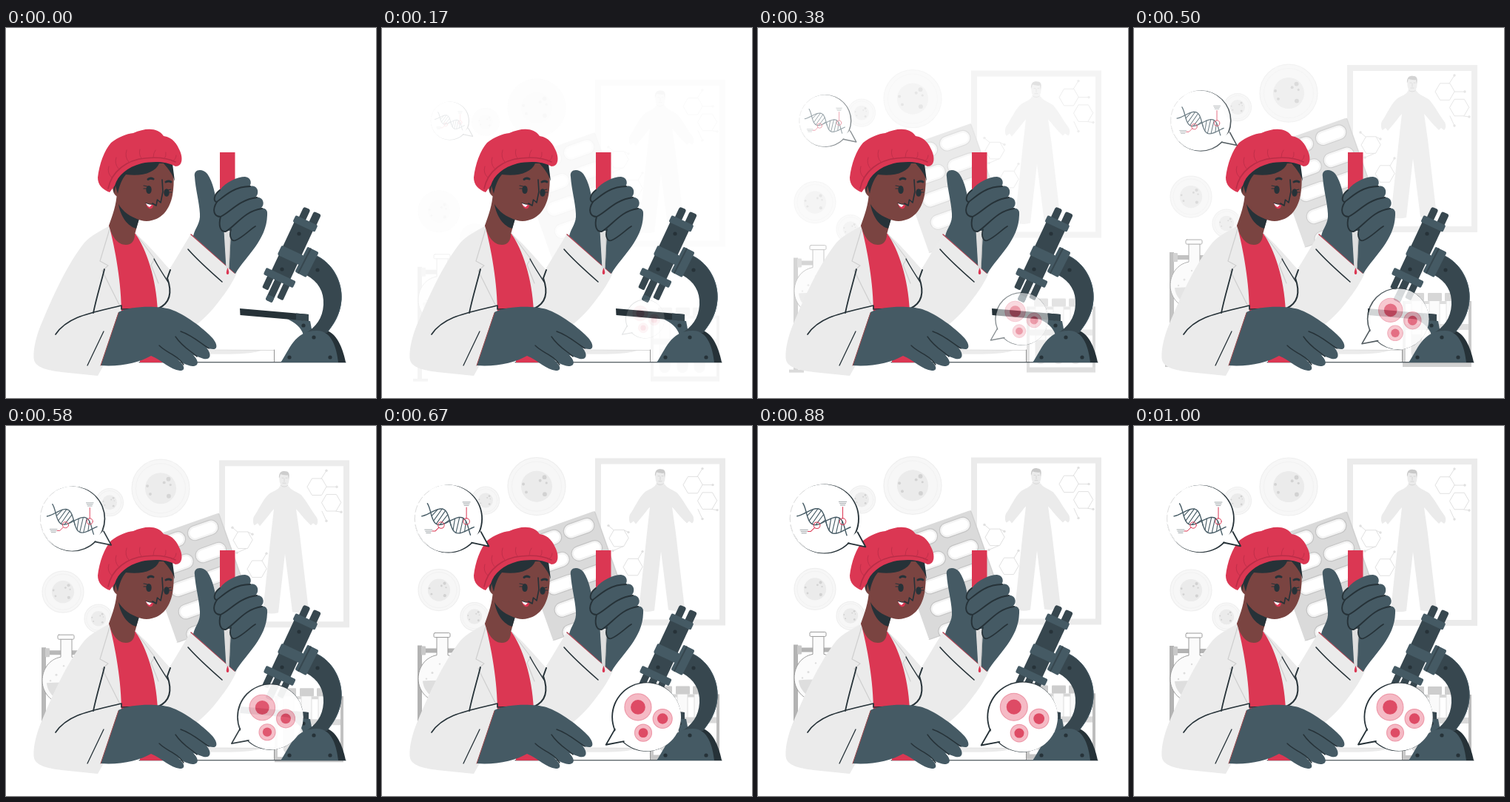
An HTML page with a canvas for the animation above (1040 ms loop, 500 by 500 pixels).

```html
<!DOCTYPE html>
<html lang="en">
<head>
<meta charset="utf-8">
<title>Lab scene</title>
<style>
html, body { margin: 0; width: 100%; height: 100%; overflow: hidden; background: #fff; }
canvas { display: block; width: 500px; height: 500px; }
</style>
</head>
<body>
<canvas id="stage" width="500" height="500"></canvas>
<script>
const SIZE = 500, LOOP = 1040, FPS = 24;
const INK = '#263238', SLATE = '#455a64', DEEP = '#37474f', RED = '#db3753',
  COAT = '#ebebeb', SKIN = '#7a4441', WHITE = '#fff';

const stage = document.getElementById('stage').getContext('2d');
const scratch = makeCanvas(), still = makeCanvas();
let c = stage;

function makeCanvas() {
  const el = document.createElement('canvas');
  el.width = el.height = SIZE;
  return el.getContext('2d');
}

function paint(path, fill, stroke, width = 1) {
  if (fill) { c.fillStyle = fill; c.fill(path); }
  if (stroke) { c.strokeStyle = stroke; c.lineWidth = width; c.stroke(path); }
}
const shape = (d, fill, stroke, width) => paint(new Path2D(d), fill, stroke, width);
const line = (d, color, width) => shape(d, null, color, width);

function oval(x, y, rx, ry, fill, stroke, width) {
  const p = new Path2D();
  p.ellipse(x, y, rx, ry, 0, 0, Math.PI * 2);
  paint(p, fill, stroke, width);
}
const disc = (x, y, r, fill, stroke, width) => oval(x, y, r, r, fill, stroke, width);

function box(x, y, w, h, r, fill, stroke, width) {
  const p = new Path2D();
  p.roundRect(x, y, w, h, r);
  paint(p, fill, stroke, width);
}

function turned(x, y, deg, draw) {
  c.save();
  c.translate(x, y);
  c.rotate(deg * Math.PI / 180);
  draw();
  c.restore();
}

// ---- Backdrop ----
function cell(x, y, r) {
  disc(x, y, r, '#f7f7f7', '#efefef', 1.2);
  disc(x, y, r * 0.86, null, '#f2f2f2', 1);
  disc(x, y, r * 0.54, '#ebebeb');
  const spots = [[0.27, -0.32, 0.075], [0.12, -0.2, 0.05], [-0.46, -0.08, 0.05],
    [-0.36, 0.2, 0.05], [0.28, 0.27, 0.075], [0.34, -0.12, 0.04]];
  for (const [dx, dy, s] of spots) disc(x + dx * r, y + dy * r, s * r, '#d2d2d2');
}

function hexagon(x, y) {
  let d = '';
  for (let i = 0; i < 6; i++) {
    const a = i * Math.PI / 3;
    d += (i ? 'L' : 'M') + (x + 13 * Math.cos(a)) + ' ' + (y + 13 * Math.sin(a));
  }
  line(d + 'Z', '#e0e0e0', 1);
}

function bond(x, y, x2, y2) {
  line(`M${x} ${y}L${x2} ${y2}`, '#e0e0e0', 1);
  disc(x2, y2, 1.7, '#e0e0e0');
}

function poster() {
  box(288, 44, 176, 226, 0, COAT);
  box(296, 52, 160, 210, 0, WHITE);
  hexagon(420, 80); hexagon(439.5, 101.5); hexagon(320, 152); hexagon(339, 191);
  bond(426, 69, 433, 58); bond(433, 80, 447, 80); bond(446, 113, 453, 114);
  bond(427, 113, 433, 126); bond(313, 141, 306, 135); bond(326, 163, 312, 169);
  bond(346, 180, 352, 170); bond(327, 141, 333, 144);
  shape('M370 79C369 84 360 86 355 90C347 97 341 112 335 120C333 125 334 131 336 132L340 129L343 133L348 127C354 120 358 114 362 110L358 145L347 249Q357 253 368 250L377 170L387 249Q399 252 409 247L397 145L392 110C398 116 401 121 406 126L412 132L415 129L419 132C422 130 422 124 419 120C413 112 406 99 399 91C394 87 384 84 382 79Z', COAT);
  oval(376, 70, 6.6, 10.5, COAT);
  shape('M369 69C368 59 374 58 378 59C384 59 383 66 382 70L381 64C377 65 373 63 371 63Z', '#c9c9c9');
  line('M373 68h2M378 68h2M376 69v4M374 75h4M371 78Q376 82 381 78', '#d0d0d0', 0.8);
}

function blister() {
  turned(288, 115, -19.5, () => {
    box(-112, 0, 112, 147, 3, '#dadada');
    line('M-112 146L0 146M-1 1L-1 146', '#cecece', 1);
    for (let row = 0; row < 4.5; row++) {
      for (let col = 0; col < 2; col++) {
        const x = -50 - col * 47, y = 5 + row * 32;
        box(x, y, 43, 20, 10, '#f3f3f3', '#c4c4c4', 1.2);
        box(x + 3, y + 3, 37, 14, 7, WHITE);
      }
    }
  });
}

function flask() {
  box(48, 297, 6, 152, 0, '#b3b3b3');
  box(42, 448, 20, 4, 0, '#bdbdbd');
  box(54, 301, 50, 6, 0, '#b3b3b3');
  box(53, 298, 6, 12, 1, '#c9c9c9');
  shape('M74 286L74 310C58 313 49 327 49 342C49 360 64 374 81 374C99 374 113 360 113 342C113 327 104 313 89 310L89 286Z', '#fbfbfb', '#9a9a9a', 1);
  shape('M55 345Q80 343 107 346C105 360 94 370 81 370C67 370 56 358 55 345Z', '#dedede');
  box(70, 280, 22, 6, 1.5, WHITE, '#9a9a9a', 1);
  disc(68, 334, 1.5, '#ddd'); disc(60, 342, 1.2, '#ddd'); disc(78, 322, 1.2, '#ddd');
}

function rack() {
  box(363, 363, 93, 4, 0, '#d6d6d6');
  for (const x of [373, 397, 420]) {
    box(x + 2, 362, 14, 78, [0, 0, 7, 7], '#fafafa', '#dcdcdc', 1);
    box(x + 2, 408, 14, 32, [0, 0, 7, 7], '#dedede');
    box(x, 352, 19, 11, 1, '#cdcdcd');
  }
  box(363, 394, 93, 8, 0, '#d9d9d9');
  box(363, 363, 4, 86, 0, '#cacaca');
  box(452, 363, 4, 86, 0, '#bdbdbd');
  box(363, 445, 93, 7, 0, '#c6c6c6');
}

function backdrop() {
  cell(209, 82, 39); cell(140, 101, 18.5); cell(77, 222, 28); cell(125, 258, 19);
  poster(); blister(); flask(); rack();
}

// ---- Microscope and table ----
function table() {
  box(250, 435, 112, 16, 0, WHITE);
  line('M250 435L362 435.5', '#d9d9d9', 1);
  shape('M255 436L345 436C325 442 290 441 255 440Z', '#ebebeb');
  line('M362.5 435L362.5 451', '#777', 0.8);
  line('M180 451.8L459 451.8', INK, 1.1);
}

function microscope() {
  shape('M428 408C447 408 456 436 459 452L444 452Z', INK);
  shape('M380 393L411 396L414 412L402 415C399 404 390 398 380 393Z', SLATE);
  shape('M418 307C443 318 455 345 453.5 367C452 389 441 402 434 412L404 413C419 404 428 392 429 374C430 356 422 343 406 334Z', DEEP);
  line('M420 308C443 319 454.5 345 453 367C451.5 389 441 402 435 410', SLATE, 1);
  shape('M371 452C383 436 389 409 420 409C441 409 447 434 449 452Z', SLATE);
  shape('M316 379L409 387L409 396L316.5 388Z', INK);
  shape('M392 385.5L409 387L409 396L392 394.5Z', DEEP);
  turned(407, 316.5, 27, () => {
    box(-9, -19, 17, 38, 2, SLATE);
    box(-5, -19, 2, 38, 0, DEEP);
  });
  turned(387.5, 299.5, 25, () => {
    box(-11, -59, 10, 25, 3, DEEP);
    box(4, -59, 11, 25, 3, DEEP);
    box(-14, -38, 28, 78, 0, DEEP);
    box(-16, -44, 33, 10, 2, SLATE);
    box(-16, 1, 33, 14, 2, SLATE);
    box(-16, 42, 9, 22, 2, DEEP);
    box(-5, 43, 10, 34, 2, DEEP);
    box(8, 42, 9, 26, 2, DEEP);
    box(-5, 69, 10, 8, 2, SLATE);
    box(-22, 37, 44, 10, 2, SLATE);
  });
  for (const [x, y] of [[396, 278], [373, 326], [421, 327], [402, 402], [383, 445], [416, 418], [438, 445]])
    disc(x, y, 2.6, INK);
}

// ---- Scientist ----
function body() {
  shape('M181 452L181 440L205 442L212 452Z', RED);
  shape('M140 267C128 274 114 281 106 290C82 320 62 365 46 404C39 422 36 440 38 449C41 460 60 463 75 465L124 470L152 420L215 420L248 407C262 399 278 383 288 369Q304 349 312 331L250 278L221 326C205 308 188 288 175 278Z', COAT);
  shape('M139 266L175 278C190 300 203 338 205 382L156 386C156 345 148 300 139 266Z', RED);
  shape('M150 222C149 240 144 253 139 267C143 282 151 293 162 293C170 293 174 287 174 279L180 257Z', SKIN);
  shape('M152 238C155 256 165 268 176 271L180 258C168 256 158 248 152 238Z', INK);
  line('M140 272L127 315L138 321L130 328L154 376', '#cfcfcf', 1.2);
  line('M176 279L201 312L196 320L206 345', '#cfcfcf', 1.2);
  line('M200 312C207 325 213 334 219 343', INK, 1.4);
  line('M222 327L218 338C224 355 223 371 206 379', INK, 2);
  line('M133 326C128 346 122 365 118 385', INK, 1.8);
  line('M67 414C84 389 116 385 156 375L156 380L190 379', INK, 1.7);
  line('M132 410L110 456', INK, 1.3);
  line('M246 299C260 315 276 329 292 343', INK, 1.6);
  line('M250 279L309 331', '#b63f50', 1.5);
}

function head() {
  shape('M147 205C141 213 145 229 153 228C157 245 170 260 190 261C210 260 221 246 225 226C228 207 227 192 222 181L170 182Z', SKIN);
  shape('M146 224C144 209 150 195 162 184L175 165L223 168L228 207C225 197 219 190 213 183L207 183C202 195 185 201 162 198C156 205 153 214 151 224L148 213Z', INK);
  shape('M124 202C126 184 133 165 142 155C152 147 163 143 172 142C188 135 205 134 213 146C226 148 231 157 235 166C239 175 239 187 229 187C216 180 199 180 183 183C164 188 151 199 147 213L140 222C130 218 124 212 124 202Z', RED);
  line('M138 217C143 193 164 178 188 176C207 174 219 176 229 181', '#b92d47', 1.6);
  line('M143 202Q136 196 139 187M152 190Q146 183 149 175M166 181Q160 175 163 165M183 176Q179 171 181 164M199 175Q199 169 202 165M214 177Q217 172 216 168M225 180Q230 177 230 172', '#c12f4a', 1);
  oval(193, 218.5, 3.7, 5.5, INK);
  oval(217, 222.5, 3.7, 5.2, INK);
  line('M191 214L186 213M190 217L186 217M219 219L223 218M219 222L224 222', INK, 1.2);
  line('M192 204.5Q195 202 199 204M216 208Q220 206 223 208', INK, 3);
  line('M211 205L212 221L209 236L204.5 232L203 240L198 237', INK, 1.6);
  shape('M189 236.5C193 239 196 238 199 239C199 246 191 247 189 236.5Z', RED);
  shape('M189 236.5L197 239L194 242C191 241 190 239 189 236.5Z', WHITE);
  line('M189 236.5Q194 239 199 238', INK, 1);
}

function raisedHand() {
  box(289, 168, 20.5, 62, 0, RED);
  shape('M255 201C253 191 265 189 272 197C280 208 283 226 285 239L340 245C349 241 354 245 353 253C352 287 325 307 310 332L253 281C256 269 263 264 262 251C261 234 256 218 255 201Z', SLATE);
  shape('M294.5 274L304 274L301.5 325L297.5 325Z', '#dedede');
  line('M303.5 276L301.3 323', '#b8b8b8', 0.8);
  shape('M299.5 324C303 332 300.5 333 299.3 333C297.5 333 297 330 299.5 324Z', RED);
  shape('M289 219C297 208 313 201 323 201C332 202 332 211 329 214C341 211 343 224 337 229C348 227 351 239 344 244C355 242 355 254 348 261C333 276 320 288 309 288C303 287 302 281 304 272L296 276C289 275 287 265 289 256C281 255 279 246 284 236C279 234 282 225 289 219Z', SLATE);
  line('M289 219C280 226 280 235 285 235C296 226 309 214 330 214', INK, 1.9);
  line('M285 235C278 246 281 255 290 255C304 248 315 232 339 229', INK, 1.9);
  line('M290 255C287 266 289 276 297 275C310 268 322 247 346 244', INK, 1.9);
  line('M304 272C301 282 305 289 310 287C320 283 330 272 337 268', INK, 1.7);
}

function restingHand() {
  shape('M152 384C169 375 205 375 222 380C242 387 266 405 279 419C285 426 287 434 280 434C277 434 273 433 271 432C279 442 276 449 267 447L253 442C261 450 261 457 252 457C243 456 236 451 231 447C241 455 244 463 235 463C222 462 211 449 196 443C180 452 155 458 128 456Z', SLATE);
  line('M152 385L128 456', '#a04b4f', 1);
  line('M236 410C251 415 262 425 274 433M229 417C239 432 251 437 258 444M207 429C218 440 231 441 240 455', INK, 1.4);
}

// ---- Speech bubbles ----
function textLines(x, y) {
  for (let i = 0; i < 3; i++) line(`M${x + i} ${y + i * 2.2}h${10 - i * 2}`, '#8a9296', 0.8);
}

function helix() {
  const wave = u => 11 * Math.sin(Math.PI * u / 28);
  let a = '', b = '';
  for (let u = -9; u <= 61; u += 2) {
    a += (a ? 'L' : 'M') + u + ' ' + wave(u);
    b += (b ? 'L' : 'M') + u + ' ' + -wave(u);
  }
  for (let u = 5; u < 54; u += 5)
    line(`M${u - 2} ${wave(u - 2)}L${u + 2} ${-wave(u + 2)}`, SLATE, 1.1);
  line(a, SLATE, 1.4);
  line(b, SLATE, 1.4);
}

function dnaBubble() {
  disc(90, 125.5, 45.8, INK);
  disc(88.8, 125.1, 45.2, WHITE);
  c.setLineDash([9, 4]);
  line('M64 162A45 45 0 0 1 64 88', '#ccc', 0.7);
  c.setLineDash([]);
  shape('M119 156L144 162L133 142Z', WHITE);
  line('M121 157.5L144 162.3L133.5 143', INK, 1.8);
  turned(66, 117, 24, helix);
  disc(80, 134, 4.2, null, RED, 1);
  line('M77 137L72 142L68 142', RED, 1);
  disc(114, 129, 4.2, null, RED, 1);
  line('M114 125L114 110', RED, 1);
  textLines(58, 140);
  textLines(109, 103);
}

function cellBubble() {
  disc(357, 393, 46.5, INK);
  disc(358, 393.3, 45.7, WHITE);
  shape('M316 411L303 430.5L329 425Z', WHITE);
  line('M315 409.5L303 430.5L327 426', INK, 1.8);
  for (const [x, y, r] of [[346, 380, 18.5], [379, 395.5, 13.5], [353, 414.5, 12]]) {
    disc(x, y, r - 0.6, '#f5bac5', '#ee9aaa', 1.2);
    disc(x, y, r * 0.53, '#de4b65');
  }
}

// ---- Motion ----
// Cubic Bézier ease (.36, -.01, .5, 1.38): overshoots before it settles.
function ease(x) {
  if (x <= 0) return 0;
  if (x >= 1) return 1;
  const curve = (s, p, q) => 3 * (1 - s) ** 2 * s * p + 3 * (1 - s) * s * s * q + s ** 3;
  let lo = 0, hi = 1;
  for (let i = 0; i < 24; i++) {
    const mid = (lo + hi) / 2;
    if (curve(mid, 0.36, 0.5) < x) lo = mid; else hi = mid;
  }
  return curve(lo, -0.01, 1.38);
}

// Draws a group flat, then blends it as a whole.
function blend(alpha, draw, move) {
  c = scratch;
  c.clearRect(0, 0, SIZE, SIZE);
  c.save();
  move(c);
  draw();
  c.restore();
  stage.globalAlpha = Math.max(0, Math.min(1, alpha));
  stage.drawImage(scratch.canvas, 0, 0);
  stage.globalAlpha = 1;
  c = stage;
}

const zoom = (x, y, s) => g => { g.translate(x, y); g.scale(s, s); g.translate(-x, -y); };

function render(ms) {
  const step = Math.floor((ms + 5) * FPS / 1000);
  const p = step < 2 ? 0 : ease((step + 0.7) / FPS);
  stage.fillStyle = WHITE;
  stage.fillRect(0, 0, SIZE, SIZE);
  if (p > 0) blend(p, backdrop, g => g.translate(0, 30 * (1 - p)));
  stage.drawImage(still.canvas, 0, 0);
  if (p > 0) {
    const s = 0.5 + p / 2;
    blend(p, dnaBubble, zoom(94.5, 125.5, s));
    blend(p, cellBubble, zoom(353, 393, s));
  }
}

for (const g of [scratch, still]) g.lineCap = g.lineJoin = 'round';
c = still;
table(); microscope(); body(); head(); raisedHand(); restingHand();
c = stage;

const start = performance.now();
function tick() {
  render((performance.now() - start) % LOOP);
  requestAnimationFrame(tick);
}
tick();
</script>
</body>
</html>
```
